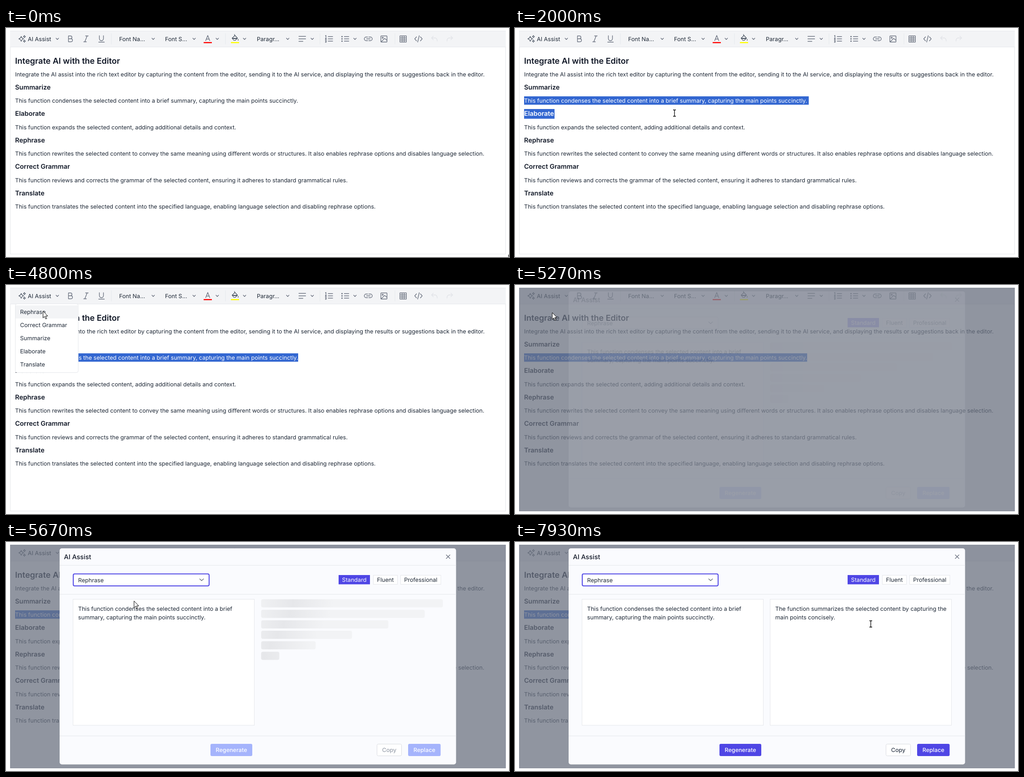
An HTML page that plays this animation: 1107x506 px, repeating every 8000 ms.

```html
<!DOCTYPE html>
<html lang="en">
<head>
<meta charset="utf-8">
<title>AI Assist in a rich text editor</title>
<style>
  html, body { margin: 0; width: 100%; height: 100%; overflow: hidden; background: #fff; }
  svg { display: block; width: 100vw; height: 100vh; }
  text { font: 400 12.6px Inter, sans-serif; text-rendering: geometricPrecision; white-space: pre; fill: #1f2937; }
  .title { font-size: 18px; font-weight: 600; fill: #111827; }
  .head { font-size: 14.4px; font-weight: 600; fill: #111827; }
  .cap { font-size: 14.4px; font-weight: 500; fill: #111827; }
  .btn { font-weight: 500; text-anchor: middle; }
  .icon { fill: none; stroke: #6b7280; stroke-width: 1.4; stroke-linecap: round; stroke-linejoin: round; }
  .dark { stroke: #4b5563; stroke-width: 1.2; }
  .off { stroke: #e2e4e8; }
  #white text { fill: #fff; }
</style>
</head>
<body>
<svg id="stage" viewBox="0 0 1107 506" preserveAspectRatio="none"></svg>
<script>
const LOOP = 8000, STEP = 1000 / 15;
const INDIGO = '#4f46e5', BLUE = '#3367d1', LINE = '#e5e7eb';

const text = (x, y, s, cls = '', more = '') => `<text x="${x}" y="${y}" class="${cls}" ${more}>${s}</text>`;
const rect = (x, y, w, h, fill, more = '') =>
  `<rect x="${x}" y="${y}" width="${w}" height="${h}" fill="${fill}" ${more}/>`;
const icon = (d, cls = '') => `<path class="icon ${cls}" d="${d}"/>`;
const chevron = (x, y = 24, r = 2.8) => icon(`M${x - r} ${y - r / 2}l${r} ${r}l${r} ${-r}`);
const outline = (c, r = 0) => `stroke="${c}" rx="${r}"`;
const star = (x, y, r) => {
  const k = r * .2;
  return `M${x} ${y - r}q${k} ${r - k} ${r} ${r}q${k - r} ${k} ${-r} ${r}q${-k} ${k - r} ${-r} ${-r}q${r - k} ${-k} ${r} ${-r}z`;
};

const paragraphs = [
  ['Summarize', 'This function condenses the selected content into a brief summary, capturing the main points succinctly.'],
  ['Elaborate', 'This function expands the selected content, adding additional details and context.'],
  ['Rephrase', 'This function rewrites the selected content to convey the same meaning using different words or structures. It also enables rephrase options and disables language selection.'],
  ['Correct Grammar', 'This function reviews and corrects the grammar of the selected content, ensuring it adheres to standard grammatical rules.'],
  ['Translate', 'This function translates the selected content into the specified language, enabling language selection and disabling rephrase options.']
];
const headAt = i => text(20, Math.round(135.7 + i * 58.5), paragraphs[i][0], 'head');
const bodyAt = (i, more) => text(20, Math.round(165 + i * 58.5), paragraphs[i][1], '', more);

function toolbar() {
  const rows = [19, 24, 29];
  return rect(9.5, 6.5, 1090, 493, '#fff', outline(LINE)) +
    rect(9, 6, 1091, 36, '#f3f4f6') + rect(9, 6, 1091, 1, LINE) + rect(9, 41.5, 1091, 1, LINE) +
    [231.5, 482.5, 690.5, 855.5].map(x => rect(x, 12, 1, 24, LINE)).join('') +
    rect(20, 12, 101, 27, 'none', 'id="assist" rx="4"') +
    icon(star(33.5, 24, 5.5) + star(40.5, 19, 2.6) + star(40.5, 29, 2.6), 'dark') +
    text(48, 29, 'AI Assist') + text(249, 29, 'Font Na...') + text(350, 29, 'Font S...') + text(552, 29, 'Paragr...') +
    [113, 324, 414, 465, 525, 620, 674, 768].map(x => chevron(x)).join('') +
    icon('M137.5 17.5v13h5.5a3.3 3.3 0 0 0 0-6.800h-5.5h4.5a3.1 3.1 0 0 0 0-6.2zM175 17.5h6M171 30.5h6M178.5 17.5l-5 13' +
      'M205.5 17v6.5a4.5 4.5 0 0 0 9 0v-6.5M204 31.3h12.5') +
    icon('M439.5 28l4.500-11.500l4.5 11.500M441 24.5h6') + rect(435, 31, 18, 2.5, '#f00') +
    icon('M497.5 22.500l6.500-6l5.5 6l-5 5h-3zM498 22.5h11.500M498.5 23.700h10M503 14v4M511 24.5v3', 'dark') +
    rect(495, 31, 18, 2.5, '#ff0') +
    icon('M644.5 18.5h15M644.5 24h15M644.5 29.500h9') +
    rows.map(y => icon(`M709 ${y}h10M744.5 ${y}h10`) +
      `<circle cx="739.5" cy="${y}" r="1.6" fill="#6b7280"/>`).join('') +
    icon('M703 17l1.200-.6v4M702.8 22.500h2.200l-2.200 3h2.400M702.8 28h2.200l-1.200 1.600a1.1 1.1 0 1 1-1 1.700') +
    icon('M796 20h-3.500a4 4 0 0 0 0 8h3.500M798.5 20h3.500a4 4 0 0 1 0 8h-3.500M793.5 24h8') +
    icon('M826 17.5h11.500q1 0 1 1v11.500q0 1-1 1h-11.500q-1 0-1-1v-11.500q0-1 1-1zM825.5 30.500l8-7.500l5 4.500') +
    '<circle cx="829" cy="21.5" r="1.3" class="icon"/>' +
    icon('M867 17.5h14v13.500h-14zM867 22h14M867 26.500h14M871.7 17.500v13.500M876.3 17.500v13.500') +
    icon('M903.5 19.500l-4 4.500l4 4.500M912 19.500l4 4.500l-4 4.500M909.5 17l-3.500 14') +
    icon('M940.5 18l-4 4l4 4M936.5 22h8.500q4 1 4 7M979 18l4 4l-4 4M983 22h-8.500q-4 1-4 7', 'off');
}

function content() {
  return text(20, 79, 'Integrate AI with the Editor', 'title') +
    text(20, 107, 'Integrate the AI assist into the rich text editor by capturing the content from the editor, sending it to the AI service, and displaying the results or suggestions back in the editor.') +
    paragraphs.map((p, i) => headAt(i) + bodyAt(i, i ? '' : 'id="line"')).join('') +
    `<g id="sel">${rect(20, 151, 0, 18.5, BLUE, 'id="sel1"')}${rect(20, 179, 67, 21.5, BLUE, 'id="sel2"')}
     <g id="white" clip-path="url(#selClip)">${bodyAt(0)}${headAt(1)}</g></g>`;
}

function menu() {
  const items = ['Rephrase', 'Correct Grammar', 'Summarize', 'Elaborate', 'Translate'];
  return `<g id="menu">${rect(20.5, 41.5, 138.5, 152, '#fff', outline(LINE, 4))}${rect(21, 45, 138, 29, '#f3f4f6')}` +
    items.map((s, i) => text(31, 64 + i * 29, s, '', i ? '' : 'id="pick"')).join('') + '</g>';
}

const bars = [400, 360, 280, 200, 120, 40];

function dialog() {
  const before = ['This function condenses the selected content into a brief', 'summary, capturing the main points succinctly.'];
  const after = ['The function summarizes the selected content by capturing the', 'main points concisely.'];
  const pane = (x, lines) => rect(x + .5, 126.5, 399, 278.5, '#fff', outline(LINE)) +
    lines.map((s, i) => text(x + 11.8, 152 + i * 19, s)).join('');
  const chip = (x, w, s) => rect(x, 73.5, w, 20, '#fff', outline(LINE)) +
    text(x + w / 2, 88, s, '', 'text-anchor="middle"');
  return `<g id="dialog">${rect(118, 14, 872.5, 477.5, '#fafbfe', 'rx="5"')}` +
    text(127.5, 38, 'AI Assist', 'cap') + icon('M969 28.500l8 8M977 28.500l-8 8') +
    [51, 115, 428].map(y => rect(118, y, 872.5, 1, LINE)).join('') +
    rect(148, 70.5, 299, 26.5, '#fff', outline('#d1d5db', 3) + ' id="field"') +
    text(158.8, 88.5, 'Rephrase') + chevron(430.5, 83.5, 4.2) +
    rect(732, 73, 69, 20.5, INDIGO) + text(766.5, 88, 'Standard', '', 'text-anchor="middle" style="fill:#fff"') +
    chip(808.5, 53, 'Fluent') + chip(868.5, 88.5, 'Professional') + pane(147, before) +
    `<g id="bones">${bars.map((w, i) => rect(561.5, 126.5 + i * 23.2, w, 18, `url(#wave${i})`, 'rx="4"')).join('')}</g>` +
    `<g id="result">${pane(561, after)}</g>` +
    rect(450, 446, 92, 27, '', 'class="primary" rx="3"') + text(496, 464.3, 'Regenerate', 'btn', 'style="fill:#fff"') +
    rect(816.5, 446.5, 54, 26, '#fff', outline('#d9dce1', 3)) + text(843.5, 464.3, 'Copy', 'btn', 'id="copy"') +
    rect(885, 446, 71.5, 27, '', 'class="primary" rx="3"') + text(920.8, 464.3, 'Replace', 'btn', 'style="fill:#fff"') + '</g>';
}

const stage = document.getElementById('stage');
stage.innerHTML = '<defs><clipPath id="selClip"><rect id="clip1" x="20" y="148" height="24"/><rect id="clip2" x="20" y="177" height="26"/></clipPath>' +
  bars.map((w, i) => `<linearGradient id="wave${i}" gradientUnits="userSpaceOnUse">
    <stop offset="0" stop-color="#f2f3f5"/><stop offset=".5" stop-color="#e6e7ea"/><stop offset="1" stop-color="#f2f3f5"/></linearGradient>`).join('') +
  '</defs>' + toolbar() + content() + menu() +
  rect(9, 6, 1091, 494, '#6b7280', 'id="veil" opacity=".75"') + dialog() +
  '<path id="arrow" d="M0 0v15l3.400-3.300l2.500 5.700l2.300-1l-2.500-5.500h4.700z" fill="#fff" stroke="#000" stroke-width="1"/>' +
  '<path id="beam" d="M-3-7h2q1 0 1 1q0-1 1-1h2M0-6v12M-3 7h2q1 0 1-1q0 1 1 1h2" fill="none" stroke="#000" stroke-width="1.3"/>';

const el = id => document.getElementById(id);
const set = (id, attrs) => { for (const k in attrs) el(id).setAttribute(k, attrs[k]); };
const show = (id, on) => set(id, { visibility: on ? 'visible' : 'hidden' });
const clamp = v => Math.max(0, Math.min(1, v));
const smooth = u => u * u * (3 - 2 * u);
const ramp = (t, a, b) => smooth(clamp((t - a) / (b - a)));
const mix = (a, b, u) => `rgb(${a.map((v, i) => Math.round(v + (b[i] - v) * u))})`;

// Pointer path: [time, x, y, linear]
const path = [
  [0, 1106, 501], [20, 1106, 501], [720, 62, 128], [870, 50, 141], [1270, 24, 158], [1420, 24, 158],
  [2000, 351, 188, 1], [2270, 560, 191, 1], [2930, 655, 166], [3330, 655, 166], [3400, 588, 155.5, 1],
  [3930, 76, 22, 1], [4480, 76, 22], [4870, 82, 61], [5420, 82, 61], [6130, 800, 310],
  [6700, 867, 283], [6950, 867, 283], [7800, 729, 176], [7930, 783, 181, 1], [8000, 783, 181]
];

function pointer(t) {
  const i = Math.max(1, path.findIndex(p => p[0] >= t));
  const [a, b] = [path[i - 1], path[i]];
  let u = clamp((t - a[0]) / (b[0] - a[0]));
  if (!b[3]) u = smooth(u);
  return [a[1] + (b[1] - a[1]) * u, a[2] + (b[2] - a[2]) * u];
}

// Right edge of the selection, snapped to whole letters
function letterEdge(x) {
  const line = el('line');
  for (let i = 0; i < line.getNumberOfChars(); i++) {
    const b = line.getExtentOfChar(i);
    if (x < b.x + b.width / 2) return b.x;
  }
  return 20 + line.getComputedTextLength();
}

function draw(t) {
  const [x, y] = pointer(t);
  const twoLines = t > 1440 && t < 2950 && y > 175;
  const end = t < 1440 ? 20 : twoLines ? 646.5 : letterEdge(t < 2930 ? x : 999);
  set('sel1', { width: end - 20 });
  set('clip1', { width: end - 20 });
  const second = twoLines ? Math.max(0, Math.min(x, 87) - 20) : 0;
  set('sel2', { width: second });
  set('clip2', { width: second });

  const pressed = t > 4130 && t < 4260;
  set('assist', { fill: pressed ? '#d1d5db' : t > 3860 && t < 4660 ? '#e5e7eb' : 'none' });
  show('menu', t > 4260 && t < 5260);
  el('pick').style.fill = t > 5130 ? '#111827' : '#1f2937';

  const open = t > 5260;
  show('veil', open);
  set('dialog', { opacity: open ? ramp(t, 5200, 5560) : 0 });
  const focus = t > 5590;
  set('field', { stroke: focus ? INDIGO : '#d1d5db', 'stroke-width': focus ? 2 : 1 });

  const ready = t > 6925;
  show('bones', !ready);
  show('result', ready);
  const wave = smooth(clamp((t - 5200) / 1750));
  bars.forEach((w, i) => {
    const c = 561.5 + w * wave;
    set('wave' + i, { x1: c - 90, x2: c + 90, y1: 0, y2: 0 });
  });
  const on = ramp(t, 6900, 7080);
  document.querySelectorAll('.primary').forEach(b => b.setAttribute('fill', mix([165, 180, 252], [79, 70, 229], on)));
  el('copy').style.fill = mix([156, 163, 175], [55, 65, 81], on);

  const inPage = x < 1099 && y > 42 && y < 499;
  const beam = open ? t > 5800 && y > 127 : inPage && t < 4400;
  show('beam', beam);
  show('arrow', !beam);
  set(beam ? 'beam' : 'arrow', { transform: `translate(${x.toFixed(1)} ${y.toFixed(1)})` });
}

// Plays at 15 pictures per second
function tick(now) {
  draw(Math.floor(((now % LOOP) + 4) / STEP) * STEP);
  requestAnimationFrame(tick);
}
draw(0);
requestAnimationFrame(tick);
</script>
</body>
</html>
```
